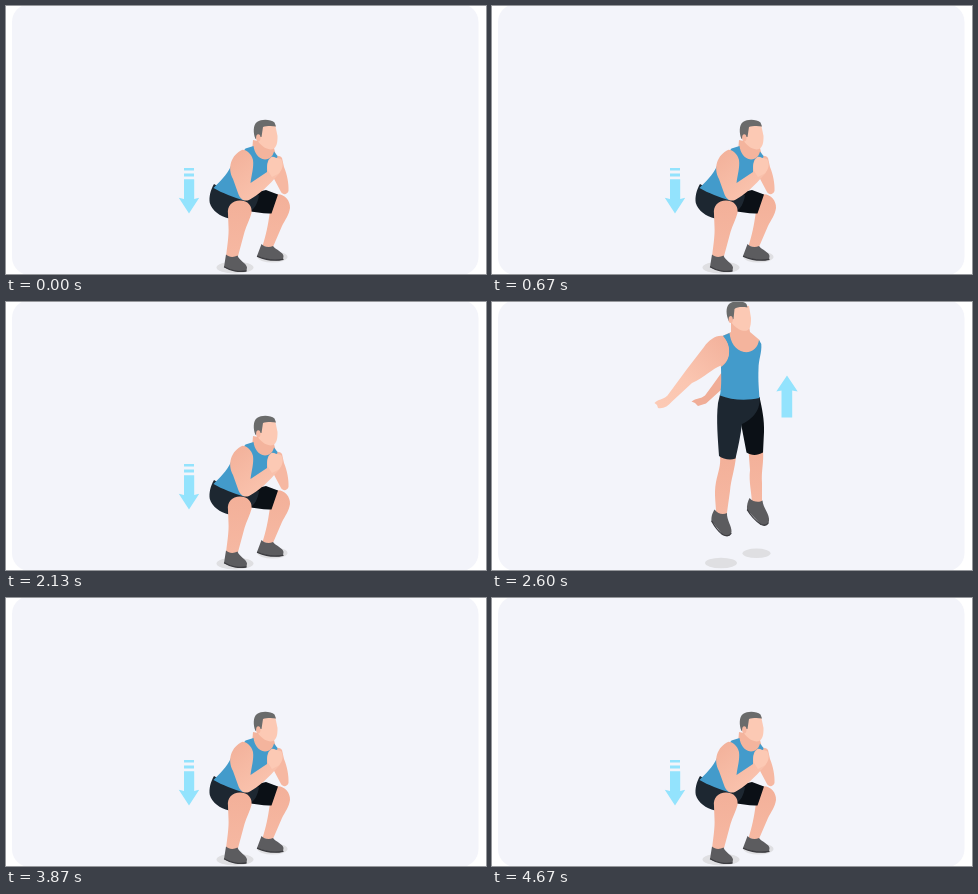
An HTML page for the animation above (4740 ms loop, 480 by 268 pixels).

```html
<!DOCTYPE html>
<html lang="en">
<head>
<meta charset="utf-8">
<title>Squat jump</title>
<style>
html, body { margin: 0; width: 100%; height: 100%; overflow: hidden; background: #fff; }
svg { display: block; width: 480px; height: 268px; }
.panel { fill: #f3f4fa; }
.shadow { fill: #dfdfe2; }
.arrow { fill: #93e3fd; }
.hair { fill: #6a6b6b; }
.face { fill: #fcc9b4; }
.neck { fill: #f4b49d; }
.skin { fill: #f6b8a2; }
.shade { fill: #f0ad97; }
.shirt { fill: #439bcb; }
.near { fill: #1d2731; }
.far { fill: #0b1016; }
.shoe { fill: #5c5c5f; }
.sole { fill: none; stroke: #3c3c40; stroke-width: 1.3; stroke-linecap: round; }
</style>
</head>
<body>
<svg viewBox="0 0 480 268">
  <defs>
    <linearGradient id="arm" x1="0" y1="0" x2=".8" y2="1">
      <stop offset="0" stop-color="#f2b099"/><stop offset="1" stop-color="#fbc6b1"/>
    </linearGradient>
    <linearGradient id="swing" x1="1" y1="0" x2="0" y2="1">
      <stop offset="0" stop-color="#f2b09a"/><stop offset=".6" stop-color="#fbc6b1"/><stop offset="1" stop-color="#fccab5"/>
    </linearGradient>
    <linearGradient id="leg" x1="0" y1="0" x2="0" y2="1">
      <stop offset="0" stop-color="#f3b099"/><stop offset="1" stop-color="#f6b8a2"/>
    </linearGradient>
  </defs>
  <rect class="panel" x="6" y="-2" width="466.500" height="271" rx="18"/>

  <g id="squat">
    <ellipse class="shadow" cx="229" cy="261.500" rx="18.500" ry="6"/>
    <ellipse class="shadow" cx="266.500" cy="251" rx="15" ry="5.500"/>
    <path class="arrow" d="M178 162h10v2.600h-10zM178 167.500h10v3h-10zM178 173.200h10.200V193L193.200 191.800 183 207.500 172.800 191.800 178 193z"/>

    <!-- far leg -->
    <path fill="url(#leg)" d="M268 189C277 186 284.500 194 284 202C283 209 279 214 276 220L266.500 242L256.500 240C260 229 262 220 264 205Z"/>
    <path class="shoe" d="M255.500 238C258 241 263 242 267 240C270 244 277 246 277.500 250L277 253.500C269 256 258 253 251 250Z"/>
    <path class="sole" d="M251.500 250.300C259 253.500 269 255 277 253.300"/>
    <path class="far" d="M234 190L260 184L272 188.500L265.500 207.500C258 208 249 206 241 205Z"/>

    <!-- near leg -->
    <path class="near" d="M208 178C217 184 228 187 238 191L253 189C252 197 248 204 244 205L232 197C225 198 222 204 223 212.500C214 210.500 206 204.500 203.800 197C202.800 191 204.500 184 208 178Z"/>
    <path fill="url(#leg)" d="M222 208C221 200 226 194.500 234 194.500C242 194.500 246.500 200 245.500 207C244 213 240.500 219 238.500 226L231.500 252L220 251C221.500 238 223 229 222.500 221Z"/>
    <path class="shoe" d="M220 248.500C223 251.500 228 251.500 231.500 249.500C233.500 255 240.500 257 241 261.500L240.500 265C232 267 222 263.500 218 261Z"/>
    <path class="sole" d="M218.500 261C224 264.500 233 266.300 240 265"/>

    <!-- far arm -->
    <path class="skin" d="M266 152C269 149 274 149 276 152L278 161C281 168 283 178 282.500 185C281 189 277 189 275 186L266 169Z"/>

    <!-- torso -->
    <path class="neck" d="M247 134L267 138L270 150L261 160L246 146Z"/>
    <path class="shirt" d="M239.500 142.500L247.500 140C248.500 147 252 152.500 259 153.500C264 153 267 150 268 145.500L271.500 150L267 170L247 181L238 194.500C228 191.500 216 187 207.500 182C213 176.500 221 169 225 160Z"/>
    <path class="face" d="M253 118L269 118L271.500 130C271.500 136 271 140 268 142.500C264 145 257 142 252.500 136Z"/>
    <path class="hair" d="M249.500 133C247 127 247 119 251 116C256 112.500 265 113.500 268.500 116.500L270 120.500C265 119.500 260 120 257 121L255.500 131L253 131Z"/>
    <ellipse class="skin" cx="252.300" cy="131.800" rx="2.200" ry="3.500"/>

    <!-- near arm -->
    <path fill="url(#arm)" d="M236.500 143.800C241 144 245.500 148 247 154C248 161 245.500 169 244.500 177L261 166C261 160 261 155 264 152C267 149 270 152 271 155C277 158 276 166 271 170C264 178 253 189 243 194C238 196 234 193 232 187L227 173C221 162 225 149 236.500 143.800Z"/>
    <path class="face" d="M262 165C260 158 263 152 267 151L275 153C278 157 277 164 272 168L266 171Z"/>
  </g>

  <g id="jump" visibility="hidden">
    <ellipse class="shadow" cx="229" cy="261" rx="16" ry="5.200"/>
    <ellipse class="shadow" cx="264.500" cy="251.300" rx="14" ry="4.800"/>
    <path class="arrow" d="M295 73.500L305.700 89.500L300.200 88.500V115.500H289.500V88.500L284.300 89.500Z"/>

    <!-- far arm -->
    <path class="shade" d="M230 70L220 84L213 93.500C209 97 204 96 199.500 99.500L203 101L206 104L214 101.500L230 87Z"/>

    <!-- far leg -->
    <path fill="url(#leg)" d="M256.500 148H271C272 161 269 169 270 181L270 202L260 203C260 191 256.500 180 258 168Z"/>
    <path class="shoe" d="M257.500 196C261 200 267 201 270.500 198.500C271 206 278 212 277 219C276 224 272 224.500 269 222.500L255 208C254.500 203 256 199 257.500 196Z"/>
    <path class="sole" d="M255.400 208C259 214 264 219 269 222.500Q274 224.500 276.200 221"/>

    <!-- near leg -->
    <path fill="url(#leg)" d="M228 154H244C243 167 239 177 238 189L234.500 214H224C224.500 203 221.500 193 224 180C226 170 229 164 228 154Z"/>
    <path class="shoe" d="M222.500 207.500C226 212 231 213 235 211C234.500 218 240 224 239.500 230C238.500 234.500 234 235 230.500 232.500L219.500 219C219 214 221 210 222.500 207.500Z"/>
    <path class="sole" d="M219.800 219.200C223 225 226 229 230.500 232.500Q236.500 235.500 239 231.500"/>

    <!-- shorts -->
    <path class="far" d="M243 94L267.500 95C270 106 272.500 118 272 130L271 150.500C265 154 259 153.500 254.500 150.500L248.500 119Z"/>
    <path class="near" d="M228 92.500L267.500 95C268.500 104 265 115 250 122C248.500 134 246 146 243.500 156.500C238 158.500 231 157 227 154C226 137 224 118 226 101Z"/>

    <!-- torso -->
    <path class="neck" d="M239 18L257 24L258 30L267.500 38L267 50L250 56L229 66L226 36L239 30Z"/>
    <path class="shirt" d="M230.500 34L237.500 31C238.500 40 243 48 252 50C260 51 266 46 267 38L269.300 42C270 51 266.500 57 266.500 67C266 79 267 88 267.500 96C254 99 239 98 228 93.500C230 82 229 72 229 65C239 59 240 44 230.500 34Z"/>
    <path class="face" d="M238 8L243 2L257 4L259 16C259 22 258.500 27 255 28.500C250 30 243 26 239 20Z"/>
    <path class="hair" d="M237 19.500C234 13 233.500 6 237 2C242 -2 251 -1.500 254.500 2L255.500 5.500C250 4.500 245 5 242.500 7L241.500 17L239 18Z"/>
    <ellipse class="skin" cx="238.700" cy="17.500" rx="2.100" ry="3.500"/>

    <!-- near arm -->
    <path fill="url(#swing)" d="M231 34C224 33 217 38 212 45L195 67L175.500 93.500C171 98 166 97 162.500 101L165 103L166 106C171 107 176 104.500 180 99.500L200 81C213 75 220 67 229 63.500C239 58 240 44 231 34Z"/>
  </g>
</svg>
<script>
const LOOP = 4740;
// Pose flips at these times (ms); the loop opens in the squat.
const FLIPS = [200, 670, 1200, 1670, 2200, 2670, 3130, 3600, 4130, 4600];
const LEAD = 8;
const squat = document.getElementById('squat');
const jump = document.getElementById('jump');
const show = (el, on) => el.setAttribute('visibility', on ? 'visible' : 'hidden');
const start = performance.now();

function draw(now) {
  const t = Math.max(0, now - start) % LOOP;
  const inAir = FLIPS.filter(f => t >= f - LEAD).length % 2 === 1;
  show(squat, !inAir);
  show(jump, inAir);
  requestAnimationFrame(draw);
}
draw(start);
</script>
</body>
</html>
```
